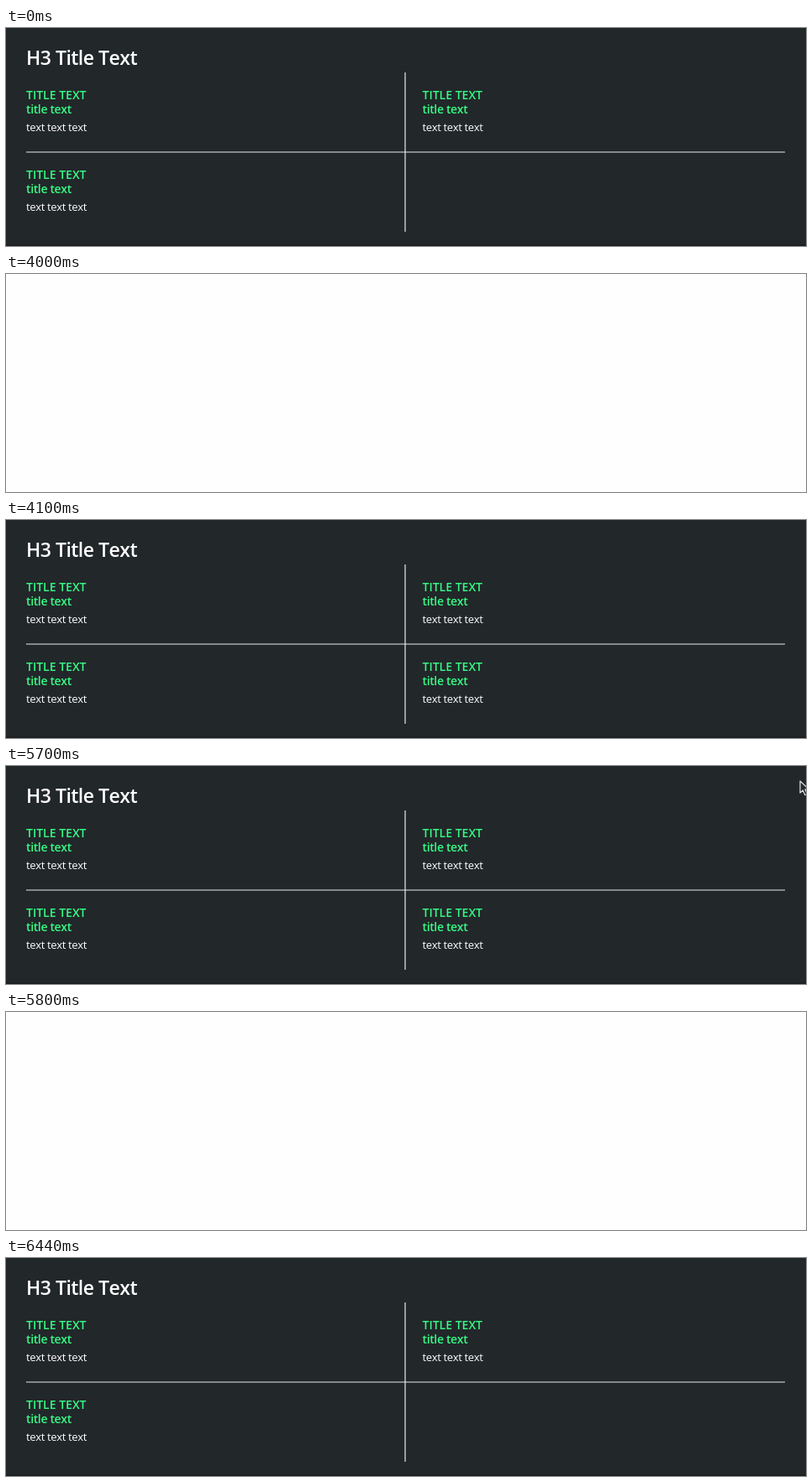
An HTML page for the animation above (6800 ms loop, 952 by 260 pixels).

```html
<!DOCTYPE html>
<html lang="en">
<head>
<meta charset="utf-8">
<title>Title text grid</title>
<style>
  html, body { margin: 0; width: 100%; height: 100%; overflow: hidden; background: #22272a; }
  svg { display: block; width: 952px; height: 260px; }
  text { font-family: "Open Sans", "Noto Sans", sans-serif; font-kerning: none; fill: #fff; }
  .heading { font-size: 23px; font-weight: 600; letter-spacing: -.5px; }
  .caps, .sub { font-size: 14px; font-weight: 600; fill: #36fb84; }
  .sub { letter-spacing: -.35px; }
  .body { font-size: 13px; letter-spacing: -.33px; }
  .rule { stroke: #e9eaea; stroke-width: 1.2; }

  .flash, .last, .pointer { visibility: hidden; animation: 6800ms step-end infinite; }
  .flash { animation-name: flash; }
  .last { animation-name: last; }
  .pointer { animation-name: pointer; }
  @keyframes flash {
    0%, 60.294%, 86.764%, 100% { visibility: hidden; }
    58.823%, 85.294% { visibility: visible; }
  }
  @keyframes last {
    0%, 85.294%, 100% { visibility: hidden; }
    60.294% { visibility: visible; }
  }
  @keyframes pointer {
    0%, 85.294%, 100% { visibility: hidden; }
    83.823% { visibility: visible; }
  }
</style>
</head>
<body>
<svg viewBox="0 0 952 260">
  <defs>
    <g id="cell">
      <text class="caps" y="85">TITLE TEXT</text>
      <text class="sub" y="101.5">title text</text>
      <text class="body" y="123">text text text</text>
    </g>
  </defs>
  <rect width="952" height="260" fill="#22272a"/>
  <rect y="258" width="952" height="2" fill="#1c2023"/>
  <text class="heading" x="24" y="44">H3 Title Text</text>
  <path class="rule" d="M24 148H927M475 53V243"/>
  <use href="#cell" x="24"/>
  <use href="#cell" x="495.5"/>
  <use href="#cell" x="24" y="95"/>
  <use class="last" href="#cell" x="495.5" y="95"/>
  <path class="pointer" d="M945 18V32L948.3 29L950.7 34.5L953.3 33.4L951 28H955.5Z"
        fill="#24282b" stroke="#d4d6d7" stroke-width="1.3" stroke-linejoin="round"/>
  <rect class="flash" width="952" height="260" fill="#fefefe"/>
</svg>
</body>
</html>
```
